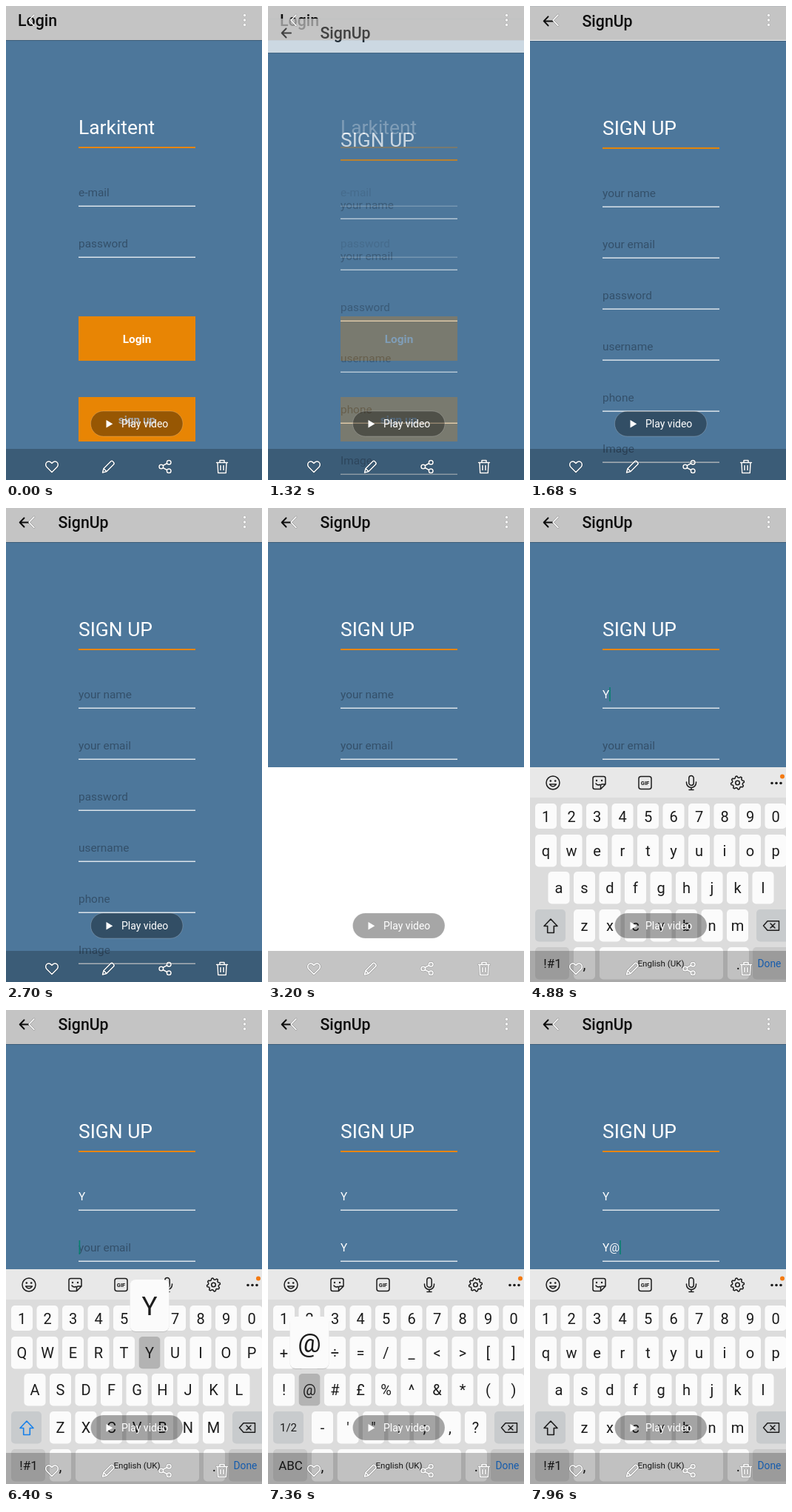
Recreate the animation shown at these times as an HTML page. Size 346x640 px, loop 8 s.

```html
<!DOCTYPE html>
<html lang="en">
<head>
<meta charset="utf-8">
<title>Sign-up screen</title>
<style>
  html, body { margin: 0; width: 100%; height: 100%; overflow: hidden; background: #fff; }
  svg { display: block; width: 346px; height: 640px; font-family: Roboto, "Noto Sans", sans-serif; }
</style>
</head>
<body>
<svg id="stage" viewBox="0 0 346 640" xmlns="http://www.w3.org/2000/svg"></svg>
<script>
const BLUE = '#4d779b', ORANGE = '#e88504', HINT = '#34506a', INK = '#1c1c1c', TEAL = '#08806f';
const LOOP = 8000, STEP = 120;

const esc = s => s.replace(/&/g, '&amp;').replace(/</g, '&lt;');
const rect = (x, y, w, h, fill, more = '') =>
  `<rect x="${x}" y="${y}" width="${w}" height="${h}" fill="${fill}" ${more}/>`;
const text = (x, y, size, fill, s, more = '') =>
  `<text x="${x}" y="${y}" font-size="${size}" fill="${fill}" ${more}>${esc(s)}</text>`;
const centred = (x, y, size, fill, s, more = '') =>
  text(x, y + size * 0.355, size, fill, s, 'text-anchor="middle" ' + more);
const path = (d, stroke, width, more = '') =>
  `<path d="${d}" fill="none" stroke="${stroke}" stroke-width="${width}" stroke-linecap="round" stroke-linejoin="round" ${more}/>`;
const dot = (x, y, r, fill, more = '') => `<circle cx="${x}" cy="${y}" r="${r}" fill="${fill}" ${more}/>`;
const group = (id, body, more = '') => `<g id="${id}" ${more}>${body}</g>`;
const at = (x, y, body) => `<g transform="translate(${x} ${y})">${body}</g>`;

// App screens
const screen = (title, titleX, heading) =>
  rect(0, 0, 346, 700, BLUE) + rect(0, 0, 346, 46, '#fff') + rect(0, 46, 346, 1, '#000', 'opacity=".22"') +
  text(titleX, 27, 21.3, '#111', title, 'font-weight="500"') +
  text(98, 173, 26.4, '#fff', heading) + rect(98, 190, 158, 2, ORANGE);

const field = (i, hint, id) =>
  text(98, 257 + 69 * i, 15.4, HINT, hint, id ? `id="${id}"` : '') +
  rect(98, 269.6 + 69 * i, 158, 1.2, '#fff');

const button = (y, label) =>
  rect(98, y, 158, 60, ORANGE) + centred(177, y + 30.5, 15.4, '#fff', label, 'font-weight="700"');

const login = screen('Login', 16, 'Larkitent') + field(0, 'e-mail') + field(1, 'password') +
  button(419, 'Login') + button(528, 'sign up');

const signUp = screen('SignUp', 70.5, 'SIGN UP') +
  path('M31 19.5H19M24.5 13.5L18.7 19.5L24.5 25.5', '#111', 2) +
  field(0, 'your name', 'name') + field(1, 'your email', 'email') +
  ['password', 'username', 'phone', 'Image'].map((s, i) => field(i + 2, s)).join('') +
  rect(0, 242, 1.6, 19, TEAL, 'id="cursor"');

// Keyboard
const PITCH = 34.5, ROW_Y = [399, 441, 491, 542, 593];
const keyBox = (x, y, w, h, fill) => rect(x, y, w, h, fill, 'rx="5"');
const keyRow = (chars, row, firstX) => [...chars].map((c, i) => {
  const x = firstX + i * PITCH, h = row ? 43.5 : 34;
  return keyBox(x - 14.5, ROW_Y[row], 29, h, '#fbfbfb') + centred(x, ROW_Y[row] + h / 2 + 0.5, 20, INK, c);
}).join('');

const layout = (id, rows, offset, shift, page) => group(id,
  keyRow(rows[0], 1, 21.5) + keyRow(rows[1], 2, offset) + keyRow(rows[2], 3, 73.5) + shift +
  centred(30.5, 615, 17, INK, page));

const shiftKey = color => path('M28 555L37 564.5H32.3V573.5H23.7V564.5H19Z', color, 1.6);
const LETTERS = ['qwertyuiop', 'asdfghjkl', 'zxcvbnm'];
const SYMBOLS = ['+×÷=/_<>[]', '!@#£%^&*()', '-\'":;,?'];

const gear = () => {
  const points = Array.from({ length: 32 }, (_, i) => {
    const a = (i - 1.5) * Math.PI / 16, r = i % 4 < 2 ? 9 : 7;
    return `${(r * Math.sin(a)).toFixed(1)} ${(-r * Math.cos(a)).toFixed(1)}`;
  });
  return path(`M${points.join('L')}Z`, INK, 1.5) + dot(0, 0, 2.8, 'none', `stroke="${INK}" stroke-width="1.5"`);
};

const toolbar = rect(0, 350, 346, 41, '#e8e8e8') +
  at(31, 371, dot(0, 0, 9, 'none', `stroke="${INK}" stroke-width="1.5"`) + dot(-3.2, -2.5, 1.3, INK) +
    dot(3.2, -2.5, 1.3, INK) + path('M-4.5 2Q0 8 4.5 2Z', INK, 1.3)) +
  at(93.5, 371, path('M-6 -8.5H6Q8.5 -8.5 8.5 -6V2L2 8.5H-6Q-8.5 8.5 -8.5 6V-6Q-8.5 -8.5 -6 -8.5ZM8.5 2H4Q2 2 2 4V8.5M-4.5 1Q-2.5 4 1 2.5', INK, 1.5) +
    dot(-3.5, -3, 1.2, INK) + dot(3.5, -3, 1.2, INK)) +
  at(155.5, 371, rect(-8.5, -8.5, 17, 17, 'none', `rx="3" stroke="${INK}" stroke-width="1.5"`) +
    centred(0, 0, 7.5, INK, 'GIF', 'font-weight="700"')) +
  at(218, 371, rect(-3.2, -9.5, 6.4, 13, 'none', `rx="3.2" stroke="${INK}" stroke-width="1.5"`) +
    path('M-6.5 -1V0A6.5 6.5 0 0 0 6.5 0V-1M0 6.5V9.5M-3 9.5H3', INK, 1.5)) +
  at(280.5, 371, gear()) +
  [327, 333, 339].map(x => dot(x, 371.5, 1.8, INK)).join('') + dot(341, 362.5, 3, '#f47a12');

const keyboard = toolbar + rect(0, 391, 346, 260, '#dcdcdc') + keyRow('1234567890', 0, 21.5) +
  keyBox(7, 542, 41, 43.5, '#c8cbcd') + keyBox(306, 542, 46, 43.5, '#c8cbcd') +
  path('M315.5 564L321 557.8H336.5V570.2H321ZM325 561L331 567M331 561L325 567', INK, 1.5) +
  keyBox(7, 593, 46, 43.5, '#cacaca') + keyBox(59, 593, 29, 43.5, '#fbfbfb') +
  keyBox(94, 593, 167, 43.5, '#fbfbfb') + keyBox(267, 593, 29, 43.5, '#fbfbfb') +
  keyBox(301, 593, 52, 43.5, '#cacaca') +
  centred(73.5, 616, 20, INK, ',') + centred(281.5, 616, 20, INK, '.') +
  centred(177, 615, 11.6, INK, 'English (UK)') + centred(323.5, 615, 13.8, '#1a76e0', 'Done') +
  layout('upper', LETTERS.map(s => s.toUpperCase()), 39, shiftKey('#1780ea'), '!#1') +
  layout('lower', LETTERS, 39, shiftKey(INK), '!#1') +
  layout('symbols', SYMBOLS, 21.5, centred(27.5, 564, 15, INK, '1/2'), 'ABC');

const popup = (id, char, x, row) => {
  const y = ROW_Y[row];
  return group(id, keyBox(x - 14.5, y, 29, 43.5, '#b3b3b3') + centred(x, y + 22, 20, INK, char) +
    rect(x - 26.5, y - 76, 53, 70, '#000', 'rx="8" opacity=".12"') +
    rect(x - 26.5, y - 77, 53, 70, '#fbfbfb', 'rx="8"') + centred(x, y - 41, 35, INK, char));
};

// Viewer controls above the recording
const outlined = (d, width) => path(d, '#000', width + 1.2, 'opacity=".22"') + path(d, '#fff', width);
const viewer = rect(0, 0, 346, 46, '#000', 'opacity=".23"') + rect(0, 598, 346, 42, '#000', 'opacity=".23"') +
  outlined('M38 12L31 19.3L38 26.5', 1.5) +
  [12.5, 19, 25.5].map(y => dot(322.5, y, 1.9, '#fff', 'stroke="#000" stroke-opacity=".22" stroke-width=".7"')).join('') +
  rect(114.5, 547, 124.5, 34, '#000', 'rx="17" fill-opacity=".35" stroke="#fff" stroke-opacity=".25" stroke-width=".8"') +
  '<path d="M135.5 559L144.3 564.2L135.5 569.4Z" fill="#fff"/>' + text(156, 569, 14, '#fff', 'Play video') +
  at(62, 622, outlined('M0 7.5L-7 .5C-11 -4 -5 -10.5 0 -4.5C5 -10.5 11 -4 7 .5Z', 1.5)) +
  at(138.5, 622, outlined('M-8 8L-6.5 2.5L3 -7Q4.5 -8.5 6.2 -6.8Q8.5 -4.8 7 -3L-2.5 6.5ZM-6.5 2.5L-2.5 6.5', 1.5)) +
  at(215, 622, outlined('M-2.8 -1.5L2.6 -4.5M-2.8 1.5L2.6 4.5M-8 0A2.8 2.8 0 1 0 -2.4 0A2.8 2.8 0 1 0 -8 0M2.4 -5.8A2.8 2.8 0 1 0 8 -5.8A2.8 2.8 0 1 0 2.4 -5.8M2.4 5.8A2.8 2.8 0 1 0 8 5.8A2.8 2.8 0 1 0 2.4 5.8', 1.5)) +
  at(292, 622, outlined('M-7.5 -5.5H7.5M-3 -5.5V-8.5H3V-5.5M-6 -5.5L-5.3 8.5H5.3L6 -5.5M-2 -1.5V4.5M2 -1.5V4.5', 1.5));

document.getElementById('stage').innerHTML = group('login', login) + group('signup', signUp) +
  rect(0, 350, 346, 290, '#fff', 'id="blank"') + group('keyboard', keyboard) +
  popup('popY', 'Y', 21.5 + 5 * PITCH, 1) + popup('popAt', '@', 21.5 + PITCH, 2) + viewer;

const $ = id => document.getElementById(id);
const show = (id, on) => $(id).style.display = on ? '' : 'none';
const between = (t, a, b) => t >= a && t < b;
const setField = (id, value, hint) => {
  $(id).textContent = value || hint;
  $(id).setAttribute('fill', value ? '#fff' : HINT);
};

// Each focus or keystroke restarts the 500 ms caret blink.
const CARET = [[3680, 98, 0], [4400, 107.2, 0], [5910, 98.6, 1], [6520, 107.2, 1], [7480, 121.2, 1]];

function render(t) {
  const tick = Math.floor(t / STEP) * STEP;
  const enter = Math.min(1, Math.max(0, (tick - 1080) / 840));
  show('signup', enter > 0);
  $('signup').setAttribute('transform', `translate(0 ${(50 * (1 - enter) ** 3.2).toFixed(2)})`);
  $('signup').setAttribute('opacity', Math.min(1, enter * 2.5));

  show('blank', t >= 3080);
  show('keyboard', t >= 3320);
  $('keyboard').setAttribute('transform', `translate(0 ${t < 3440 ? 60 : 0})`);

  const symbols = between(t, 6880, 7720);
  const upper = t < 4400 || between(t, 5720, 6520);
  show('upper', upper);
  show('lower', !upper && !symbols);
  show('symbols', symbols);
  show('popY', between(t, 4160, 4400) || between(t, 6400, 6520));
  show('popAt', between(t, 7360, 7480));

  setField('name', t >= 4400 ? 'Y' : '', 'your name');
  setField('email', t >= 7480 ? 'Y@' : t >= 6520 ? 'Y' : '', 'your email');

  const caret = CARET.filter(c => c[0] <= t).pop();
  show('cursor', caret && (t - caret[0]) % 1000 < 500);
  if (caret) $('cursor').setAttribute('transform', `translate(${caret[1]} ${69 * caret[2]})`);
}

function frame() {
  render(performance.now() % LOOP);
  requestAnimationFrame(frame);
}
frame();
</script>
</body>
</html>
```
